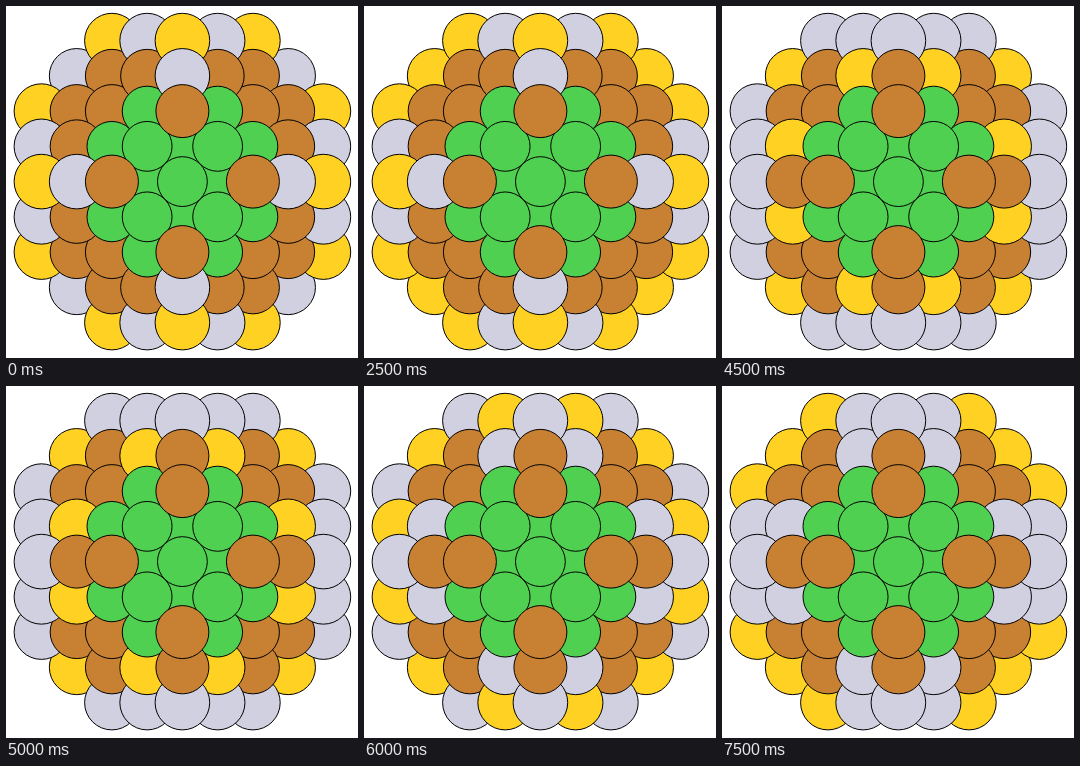
An HTML page with a canvas for the animation above (8000 ms loop, 352 by 352 pixels).

```html
<!DOCTYPE html>
<html>
<head>
<meta charset="utf-8">
<style>
html, body { margin: 0; width: 100%; height: 100%; overflow: hidden; background: #fff; }
canvas { display: block; }
</style>
</head>
<body>
<canvas id="stage" width="352" height="352"></canvas>
<script>
const ctx = document.getElementById('stage').getContext('2d');
const LOOP = 8000, STEP = 35.25, CX = 176.4, CY = 175.6;
const COLORS = { g: '#50d050', c: '#c88033', s: '#d0d0e0', y: '#ffd123' };
const RADII = { g: 24.9, c: 26.5, s: 27.3, y: 27.3 };

// Symmetry-equivalent sites share a colour; each state lists one letter per site.
const SITES = ['30', '31', '33', '40', '41', '42'];
const STATES = [
  [0, 'scsysy'], [1000, 'ycyssy'], [1500, 'scyssy'], [2500, 'scyysy'],
  [3000, 'scysss'], [3500, 'cyssss'], [4000, 'cyysss'], [5500, 'cyysys'],
  [6000, 'csysys'], [6500, 'csysss'], [7500, 'csyssy']
];

// Top layer of a truncated octahedron seen from above.
const atoms = [];
for (let j = -4; j <= 4; j++) {
  for (let i = -4; i <= 4; i++) {
    const a = Math.max(Math.abs(i), Math.abs(j));
    const b = Math.min(Math.abs(i), Math.abs(j));
    if (a + b > 6) continue;
    const z = Math.min(6 - a - b, 4 - (a + b) % 2);
    const site = '' + a + b;
    const base = a + b < 4 && site !== '20' ? 'g' : 'c';
    atoms.push({ i, j, z, base, dist: a * a + b * b, index: SITES.indexOf(site) });
  }
}
atoms.sort((p, q) => p.z - q.z || p.dist - q.dist);

function draw(now) {
  const t = now % LOOP;
  const state = STATES.filter(s => s[0] <= t).pop()[1];
  ctx.fillStyle = '#fff';
  ctx.fillRect(0, 0, 352, 352);
  ctx.strokeStyle = '#000';
  ctx.lineWidth = 1;
  for (const p of atoms) {
    const kind = p.index < 0 ? p.base : state[p.index];
    ctx.beginPath();
    ctx.arc(CX + p.i * STEP, CY + p.j * STEP, RADII[kind], 0, 2 * Math.PI);
    ctx.fillStyle = COLORS[kind];
    ctx.fill();
    ctx.stroke();
  }
}

function tick() {
  draw(performance.now());
  requestAnimationFrame(tick);
}
tick();
</script>
</body>
</html>
```
